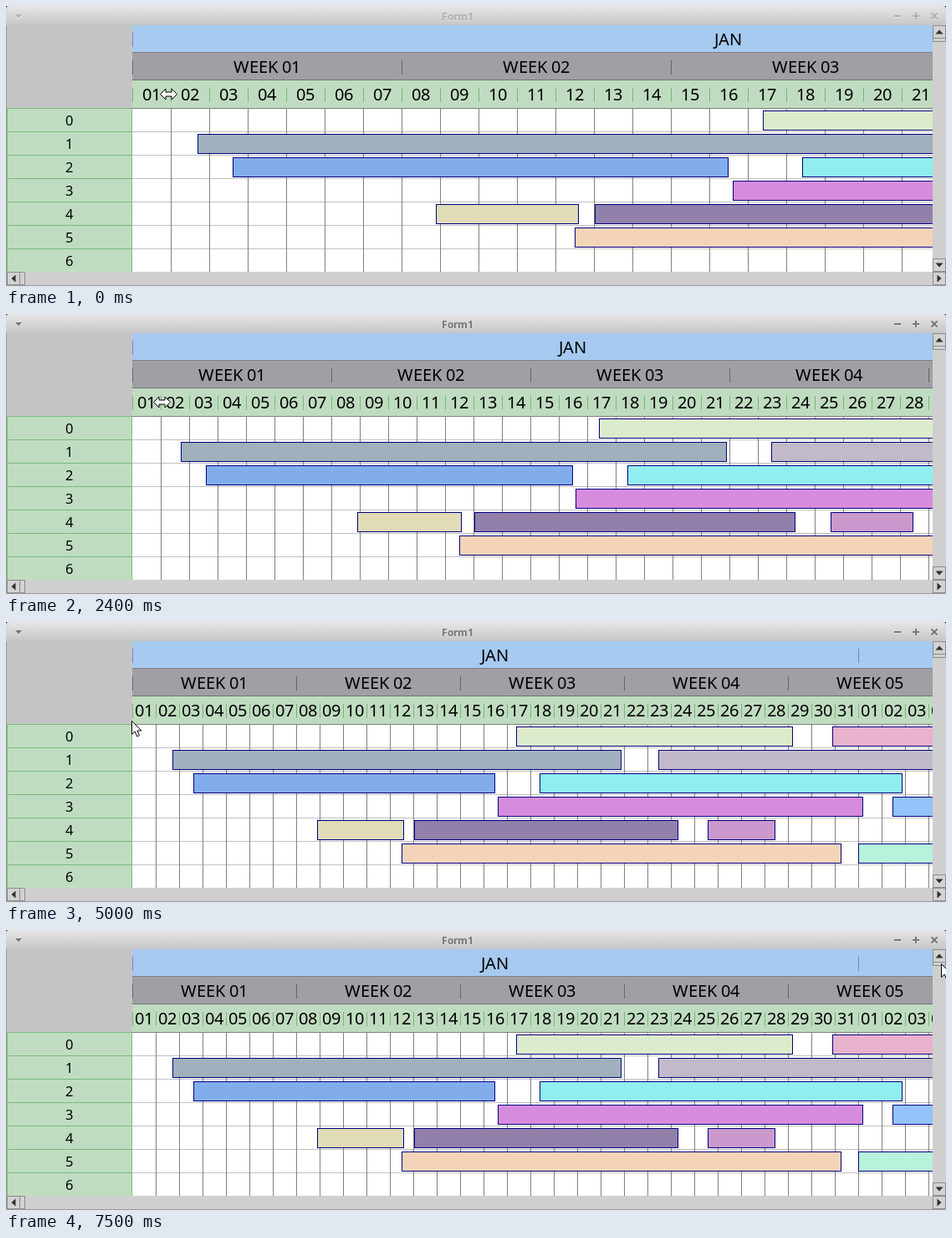
An HTML page with a canvas that plays this animation: 1124x335 px, repeating every 8 s.

```html
<!DOCTYPE html>
<html lang="en">
<head>
<meta charset="utf-8">
<title>Gantt column resize</title>
<style>
  html, body { margin: 0; width: 100%; height: 100%; overflow: hidden; background: #cfcfcf; }
  canvas { display: block; }
</style>
</head>
<body>
<canvas id="stage" width="1124" height="335"></canvas>
<script>
const ctx = document.getElementById('stage').getContext('2d', { alpha: false });
const LOOP = 8000, LEFT = 151, RIGHT = 1108, TOP = 122, BOTTOM = 318, ROW = 28;
const SANS = '"Noto Sans", "Open Sans", sans-serif';

// Key points: time, then values
const dayWidth = [[1400, 46], [1500, 42], [2400, 34], [3100, 30], [3900, 29], [4200, 28]];
const arrowPath = [[5000, 150, 118], [5200, 133, 136], [5700, 843, 78], [5800, 854, 65],
  [6700, 1117, 42], [7000, 1118, 41], [7500, 1118, 40]];

// Each row: bar colors, then alternating start and end days
const rows = [
  [['#dcebcb', '#e8b1cd'], 16.4, 28.2, 29.9],
  [['#a0b0bc', '#c3bac9'], 1.7, 20.9, 22.48],
  [['#82adec', '#91eeef'], 2.6, 15.5, 17.405, 32.9],
  [['#d68cdc', '#93c3f8'], 15.6, 31.21, 32.47],
  [['#e0dcb6', '#9180a9', '#cb99cd'], 7.9, 11.6, 12.02, 23.33, 24.565, 27.465],
  [['#f3d4b8', '#b7f2da'], 11.5, 30.3, 31]
];

const linear = p => p;
const smooth = p => p * p * (3 - 2 * p);

function along(keys, t, ease) {
  const next = keys.findIndex(key => key[0] > t);
  if (next === 0) return keys[0].slice(1);
  if (next < 0) return keys.at(-1).slice(1);
  const a = keys[next - 1], b = keys[next];
  const p = ease((t - a[0]) / (b[0] - a[0]));
  return a.slice(1).map((value, i) => value + (b[i + 1] - value) * p);
}

function rect(x, y, w, h, color) {
  ctx.fillStyle = color;
  ctx.fillRect(x, y, w, h);
}

function frame(x, y, w, h, fill, line) {
  rect(x, y, w, h, line);
  rect(x + 1, y + 1, w - 2, h - 2, fill);
}

// Glyphs sit on whole pixels, as in a hinted desktop toolkit
function label(text, x, y, size, color = '#000', weight = 400) {
  ctx.font = `${weight} ${size}px ${SANS}`;
  ctx.fillStyle = color;
  const glyphs = [...text];
  const advances = glyphs.map(glyph => Math.round(ctx.measureText(glyph).width));
  let pen = Math.floor(x - advances.reduce((sum, w) => sum + w) / 2);
  glyphs.forEach((glyph, i) => {
    ctx.fillText(glyph, pen, y);
    pen += advances[i];
  });
}

function polygon(points, x, y, fill, line) {
  ctx.beginPath();
  points.forEach(([px, py]) => ctx.lineTo(x + px, y + py));
  ctx.closePath();
  ctx.fillStyle = fill;
  ctx.fill();
  if (!line) return;
  ctx.strokeStyle = line;
  ctx.lineWidth = 1;
  ctx.stroke();
}

function titleBar(active) {
  rect(0, 0, 1124, 23, '#555');
  const shade = ctx.createLinearGradient(0, 0, 0, 23);
  shade.addColorStop(0, '#e6e6e6');
  shade.addColorStop(1, '#c6c6c6');
  ctx.save();
  ctx.beginPath();
  ctx.roundRect(0, 0, 1124, 30, 4);
  ctx.clip();
  rect(0, 0, 1124, 23, shade);
  ctx.restore();

  const ink = active ? '#777' : '#b0b0b0';
  ctx.save();
  ctx.shadowColor = 'rgba(255, 255, 255, .5)';
  ctx.shadowOffsetY = 1;
  label('Form1', 540, 17, 12, ink, 700);
  polygon([[0, 0], [8, 0], [4, 4.5]], 11, 10, ink);
  rect(1062, 11, 8, 2, ink);
  rect(1084, 11, 8, 2, ink);
  rect(1087, 8, 2, 8, ink);
  ctx.strokeStyle = ink;
  ctx.lineWidth = 2;
  ctx.beginPath();
  for (const slope of [-1, 1]) {
    ctx.moveTo(1106.5, 12 - 3.5 * slope);
    ctx.lineTo(1113.5, 12 + 3.5 * slope);
  }
  ctx.stroke();
  ctx.restore();
}

function rowHeaders() {
  rect(0, 23, LEFT, 100, '#c4c4c4');
  for (let row = 0; row < 7; row++) {
    const y = TOP + row * ROW;
    frame(1, y, 150, ROW + 1, '#c0dcc0', '#7cbb7c');
    label(String(row), 75.5, y + 21, 16.5);
  }
  rect(0, 23, 1, 312, '#999');
}

function band(y, h, color, line) {
  rect(LEFT, y, RIGHT - LEFT, h, color);
  rect(LEFT, y + h, RIGHT - LEFT, 1, line);
}

// One header line: equal spans with a tick at each start and a centered caption
function spans(count, width, y, tick, caption) {
  for (let i = 0; i < count; i++) {
    const x = LEFT + i * width;
    rect(x, y - 15, 1, 17, tick);
    label(caption(i), x + Math.floor(width / 2), y, 20);
  }
}

function timeHeaders(day) {
  band(23, 32, '#a6caf0', '#808080');
  band(56, 32, '#a0a0a4', '#707074');
  band(89, 33, '#c0dcc0', '#808080');
  const pad = n => String(n).padStart(2, '0');
  spans(1, 31 * day, 47, '#6a8db5', () => 'JAN');
  rect(LEFT + 31 * day, 32, 1, 17, '#4b93dc');
  spans(6, 7 * day, 80, '#66666a', i => 'WEEK ' + pad(i + 1));
  spans(36, day, 113, '#7cb47c', i => pad(i % 31 + 1));
}

function chart(day) {
  rect(LEFT, TOP, RIGHT - LEFT, BOTTOM - TOP, '#fff');
  for (let y = 150; y < BOTTOM; y += ROW) rect(LEFT, y, RIGHT - LEFT, 1, '#c0c0c0');
  for (let x = LEFT + day; x < RIGHT; x += day) rect(x, TOP, 1, BOTTOM - TOP, '#808080');
  rows.forEach(([colors, ...days], row) => colors.forEach((color, i) => {
    const [start, end = 45] = days.slice(2 * i);
    const x = Math.round(start * day);
    frame(LEFT + x, 125 + row * ROW, Math.round(end * day) - x, 24, color, '#000080');
  }));
}

function scrollButton(x, y, angle) {
  frame(x, y, 16, 16, '#d2d2d2', '#8c8c8c');
  ctx.save();
  ctx.translate(x + 8, y + 8);
  ctx.rotate(angle);
  polygon([[-4.5, 2.5], [0, -2.5], [4.5, 2.5]], 0, 0, '#303030');
  ctx.restore();
}

function scrollBars() {
  rect(RIGHT, 23, 16, 312, '#cfcfcf');
  rect(1, BOTTOM, 1123, 17, '#cfcfcf');
  scrollButton(RIGHT, 23, 0);
  frame(RIGHT, 38, 16, 5, '#d2d2d2', '#8c8c8c');
  scrollButton(RIGHT, 302, Math.PI);
  scrollButton(1, BOTTOM, -Math.PI / 2);
  frame(16, BOTTOM, 7, 16, '#d2d2d2', '#8c8c8c');
  scrollButton(RIGHT, BOTTOM, Math.PI / 2);
  rect(0, 334, 1124, 1, '#999');
}

function resizeCursor(day) {
  const half = [[-10, 0], [-3.5, -6.5], [-3.5, -2.5], [3.5, -2.5], [3.5, -6.5]];
  const outline = half.concat(half.map(([x, y]) => [-x, -y]));
  polygon(outline, Math.min(194, LEFT + 1 + day) + .5, 105.5, '#fff', '#000');
}

function arrowCursor(t) {
  const [x, y] = along(arrowPath, t, smooth);
  polygon([[0, 0], [0, 16], [3.7, 12.5], [6.2, 18.4], [9, 17.2], [6.5, 11.5], [11.5, 11.5]],
    Math.floor(x) + .5, Math.ceil(y) + .5, '#fff', '#000');
}

function draw(now) {
  const t = Math.floor(now % LOOP / 100) * 100;
  const day = Math.ceil(along(dayWidth, t, linear)[0] - 1e-6);
  ctx.save();
  ctx.beginPath();
  ctx.rect(LEFT, 23, RIGHT - LEFT, BOTTOM - 23);
  ctx.clip();
  chart(day);
  timeHeaders(day);
  ctx.restore();
  titleBar(t >= 1100);
  rowHeaders();
  scrollBars();
  if (t < arrowPath[0][0]) resizeCursor(day);
  else arrowCursor(t);
}

const begin = performance.now();
function tick() {
  draw(performance.now() - begin);
  requestAnimationFrame(tick);
}
tick();
</script>
</body>
</html>
```
